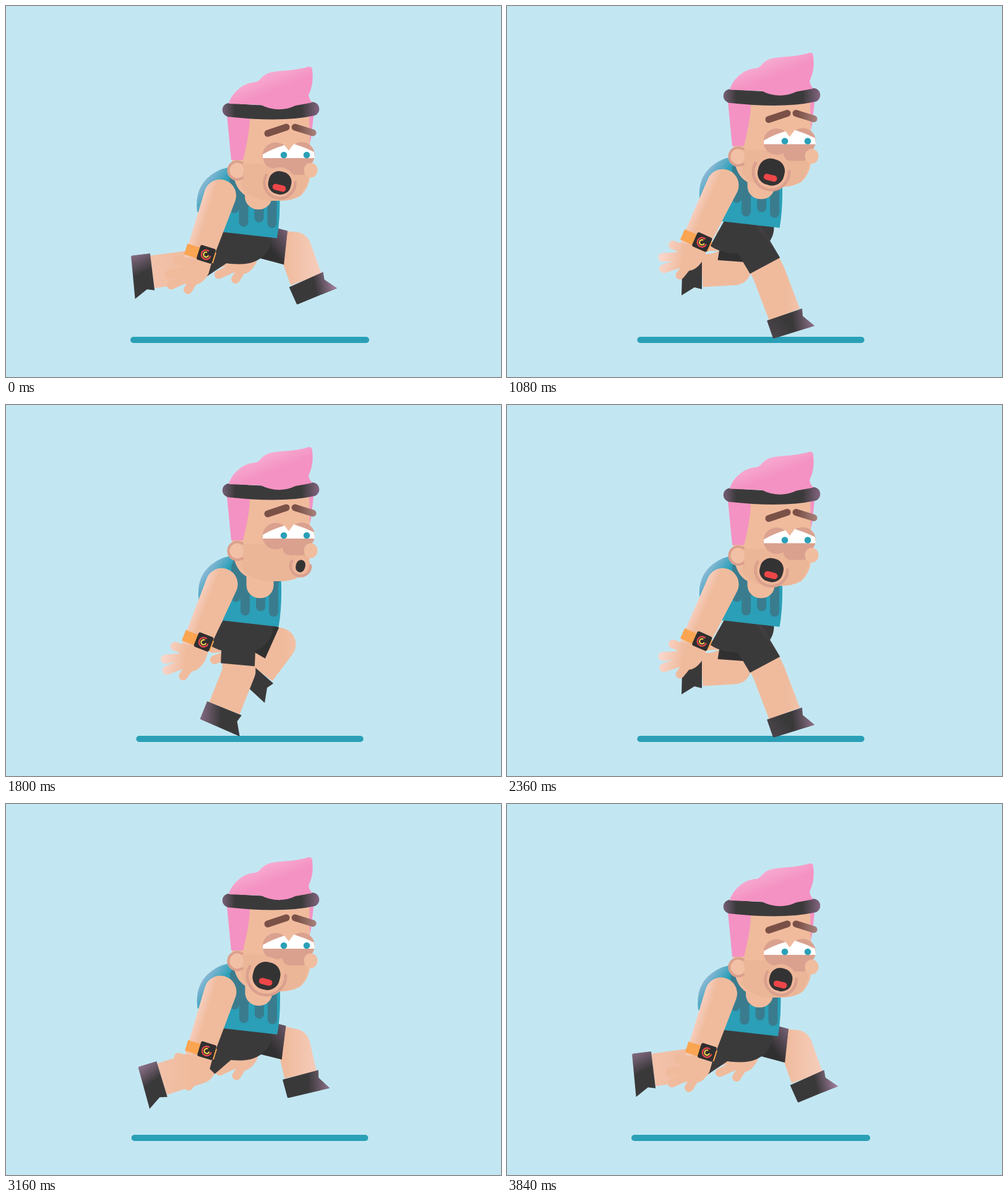
An HTML page that plays this animation: 800 by 600 pixels, repeating every 3.88 s.

```html
<!DOCTYPE html>
<html lang="en">
<head>
<meta charset="utf-8">
<title>Tired runner</title>
<style>
  html, body { margin: 0; width: 100%; height: 100%; overflow: hidden; background: #c3e7f2; }
  svg { display: block; width: 800px; height: 600px; }
</style>
</head>
<body>
<svg viewBox="0 0 800 600">
  <defs>
    <linearGradient id="skin" gradientUnits="userSpaceOnUse" x1="235" y1="0" x2="505" y2="0">
      <stop offset="0" stop-color="#f2c2aa"/><stop offset=".25" stop-color="#f0bb9d"/>
      <stop offset=".8" stop-color="#f0bb9d"/><stop offset="1" stop-color="#f5cdbb"/>
    </linearGradient>
    <linearGradient id="fingerLight" gradientUnits="userSpaceOnUse" x1="-48" y1="136" x2="-12" y2="128">
      <stop offset="0" stop-color="#fbdcd6"/><stop offset="1" stop-color="#fbdcd6" stop-opacity="0"/>
    </linearGradient>
    <linearGradient id="armEdge" x1="0" x2="1">
      <stop offset="0" stop-color="#f6cebe"/><stop offset=".3" stop-color="#f0bb9d"/>
    </linearGradient>
    <linearGradient id="heelLight" gradientUnits="userSpaceOnUse" x1="-34" y1="28" x2="0" y2="16">
      <stop offset="0" stop-color="#b48bb0"/><stop offset="1" stop-color="#b48bb0" stop-opacity="0"/>
    </linearGradient>
    <linearGradient id="toeLight" gradientUnits="userSpaceOnUse" x1="40" y1="24" x2="8" y2="18">
      <stop offset="0" stop-color="#c493bb"/><stop offset="1" stop-color="#b48bb0" stop-opacity="0"/>
    </linearGradient>
    <linearGradient id="hemLight" gradientUnits="userSpaceOnUse" x1="462" y1="355" x2="422" y2="385">
      <stop offset="0" stop-color="#b48bb0"/><stop offset="1" stop-color="#b48bb0" stop-opacity="0"/>
    </linearGradient>
    <linearGradient id="hairFill" gradientUnits="userSpaceOnUse" x1="415" y1="70" x2="430" y2="108">
      <stop offset="0" stop-color="#f8b3d6"/><stop offset="1" stop-color="#f492c3"/>
    </linearGradient>
    <linearGradient id="bandFill" gradientUnits="userSpaceOnUse" x1="350" y1="0" x2="506" y2="0">
      <stop offset="0" stop-color="#765f76"/><stop offset=".13" stop-color="#3b3a3b"/>
      <stop offset=".82" stop-color="#3b3a3b"/><stop offset="1" stop-color="#846580"/>
    </linearGradient>
    <linearGradient id="shirtFill" gradientUnits="userSpaceOnUse" x1="318" y1="258" x2="362" y2="290">
      <stop offset="0" stop-color="#a8c0de"/><stop offset=".7" stop-color="#2a9fb7"/>
    </linearGradient>
    <linearGradient id="browFill" gradientUnits="userSpaceOnUse" x1="470" y1="0" x2="502" y2="0">
      <stop offset="0" stop-color="#7b5147"/><stop offset="1" stop-color="#a9837e"/>
    </linearGradient>
    <clipPath id="shirtClip"><use href="#shirt"/></clipPath>
    <path id="shirt" d="M343 348L440 359Q446 325 444 280L390 246Q358 238 333 257Q306 277 311 316Z"/>
    <path id="boot" d="M-30 0H30L27 12L40 33L-28 31Q-30 31-30 29Z"/>
    <path id="fingers" fill="none" stroke-width="14" stroke-linecap="round" d="M-6 120L-34 121M-6 128L-41 146M-2 135L-32 162M3 135L-4 161"/>
    <g id="hand">
      <use href="#fingers" stroke="#f0bb9d"/>
      <path d="M-24 92H19L20 126Q15 149 1 150Q-22 148-24 122Z" fill="#f0bb9d"/>
    </g>
    <g id="leg">
      <path class="limb" fill="none" stroke="url(#skin)" stroke-width="53" stroke-linejoin="round"/>
      <g class="foot">
        <use href="#boot" fill="#3a393a"/>
        <use class="heel" href="#boot" fill="url(#heelLight)"/>
        <use class="toe" href="#boot" fill="url(#toeLight)"/>
      </g>
      <path class="shorts"/>
      <path class="hem" fill="url(#hemLight)"/>
    </g>
  </defs>

  <line id="ground" y1="540" y2="540" stroke="#2aa0b7" stroke-width="10" stroke-linecap="round"/>
  <use id="farArm" href="#hand"/>
  <g id="farLeg" fill="#313031"></g>
  <path id="pelvis" fill="#3b3a3b" d="M352 345L430 350Q434 370 420 386Q405 401 380 401Q345 401 328 388Z"/>
  <g id="nearLeg" fill="#3b3a3b"></g>

  <g id="torso">
    <use href="#shirt" fill="url(#shirtFill)"/>
    <g clip-path="url(#shirtClip)" opacity=".5">
      <path d="M366 244Q366 290 392 308L432 306L444 280L390 240Z" fill="#4a5a66"/>
      <path d="M371 262V311M386 270V333M411 300V326M432 285V335" fill="none" stroke="#4a5a66" stroke-width="15" stroke-linecap="round"/>
    </g>
    <rect x="388" y="250" width="44" height="62.500" rx="21" fill="#f0bb9d"/>
  </g>

  <g id="head">
    <path d="M489 148H497L493 184L490 196Z" fill="#f492c3"/>
    <path d="M384 145H490L492 236Q492 262 476 277Q462 285 444 285H428C400 285 375 280 368 246L365 215Z" fill="#f0bb9d"/>
    <path d="M384 225H488Q490 262 474 277Q460 285 444 285H428Q392 284 380 262Z" fill="#e0a98d" opacity=".35"/>
    <path d="M357 147L394 151Q394 175 383 219H364Z" fill="#f492c3"/>
    <circle cx="371" cy="236" r="13" fill="#f2c0a4"/>
    <path d="M382 224A14.500 14.500 0 1 0 382 248" fill="none" stroke="#dba08d" stroke-width="4" stroke-linecap="round"/>
    <g fill="#daa18f">
      <circle cx="436" cy="212" r="21.500"/><circle cx="478" cy="211" r="21"/>
      <rect x="447" y="205" width="43" height="38" rx="12"/>
    </g>
    <ellipse cx="492.500" cy="235.500" rx="11" ry="12" fill="#f1bd9f"/>
    <path d="M415 216V210Q430 201 450 195L457 204L465 193Q482 198 498 206L499 216Z" fill="#fff"/>
    <g fill="#2aa0b7"><circle cx="449" cy="211" r="5.300"/><circle cx="486" cy="211" r="5.300"/></g>
    <g fill="none" stroke-width="11" stroke-linecap="round">
      <path d="M423 176L453 166" stroke="#7b5147"/><path d="M467 166L496 175" stroke="url(#browFill)"/>
    </g>
    <path d="M361 138Q445 147 495 136.500" fill="none" stroke="url(#bandFill)" stroke-width="22.500" stroke-linecap="round"/>
    <path fill="url(#hairFill)" d="M360 128C364 112 382 94 403 93C413 92 411 79 435 76C455 74 475 73 489 68Q495 67 495 74C497 92 494 103 489 114Q490 121 495 126Q480 129 468 131Q440 144 412 130Z"/>
    <g id="mouth">
      <circle id="lip" fill="#eeb699"/>
      <path id="lipLine" fill="none" stroke="#dba08d" stroke-width="4.500" stroke-linecap="round"/>
      <rect id="hole" fill="#343334"/>
      <rect id="tongue" x="-11" y="-5" width="22" height="10" rx="5" fill="#ee4648"/>
    </g>
  </g>

  <g id="nearArm">
    <use href="#hand"/>
    <use id="pale" href="#fingers" stroke="url(#fingerLight)"/>
    <path d="M-26 0A26 26 0 0 1 26 0L19 112H-25Z" fill="url(#armEdge)"/>
    <rect x="-27" y="90" width="49" height="18" fill="#faa551"/>
    <rect x="-6" y="85" width="26" height="25" rx="3" fill="#302f30"/>
    <g fill="none" stroke-width="2.200">
      <circle cx="7" cy="98" r="7.500" stroke="#ee4a4c" stroke-dasharray="38 9"/>
      <circle cx="7" cy="98" r="4" stroke="#f3d34e" stroke-dasharray="19 6"/>
    </g>
  </g>
</svg>
<script>
const STEP = 40, FRAMES = 97, STRIDE = 16, BREATH = 1920;
const $ = id => document.getElementById(id);
const set = (el, attrs) => { for (const k in attrs) el.setAttribute(k, attrs[k]); };
const wave = (p, peak, period) => Math.cos(2 * Math.PI * (p - peak) / period);

// phase, hem x y, thigh angle, knee x y, ankle x y, foot angle
const LEG = [
  [0, 310, 414, 56, 304, 421, 236.5, 430, 83],
  [3, 368, 413, 4, 368, 425, 315, 428, 90],
  [5, 430, 385, -66, 442, 387, 409.5, 430.5, 41],
  [7, 449, 386, -83, 465, 390, 476, 438, -15],
  [8, 452, 391, -84, 467, 392, 485, 442.5, -24],
  [11, 417, 420, -28, 423, 432, 448.5, 499, -19],
  [12, 396, 423, -11, 401, 434, 403, 510, 0],
  [13, 374.5, 420, 5, 377, 430, 353, 490.5, 22],
  [15, 318, 417, 45, 312, 426, 252, 445, 73]
];
// phase, eye height
const HEAD = [[0, 239], [1, 241], [3, 218.5], [4, 207], [5, 211], [7, 229]];
// time, x, drop below the eyes, half width, half height, lip radius
const MOUTH = [
  [0, 442.5, 45, 18.5, 18.5, 25],
  [440, 427.5, 48.5, 19, 19, 26],
  [1080, 427, 50, 21.5, 21.5, 29],
  [1240, 421, 49, 22, 22.5, 31],
  [1700, 474, 49.5, 8, 10.5, 16],
  [1800, 476, 49.5, 7.5, 10, 16]
];

// Smooth periodic interpolation through the rows of a key table
function sample(keys, t, period) {
  const n = keys.length;
  t = (t % period + period) % period;
  const at = i => {
    const lap = Math.floor(i / n);
    const [k, ...v] = keys[i - lap * n];
    return { k: k + lap * period, v };
  };
  let i = n - 1;
  while (keys[i][0] > t) i--;
  const [a, b, c, d] = [-1, 0, 1, 2].map(o => at(i + o));
  const span = c.k - b.k, s = (t - b.k) / span, s2 = s * s, s3 = s2 * s;
  return b.v.map((y, j) => {
    const m0 = (c.v[j] - a.v[j]) / (c.k - a.k) * span;
    const m1 = (d.v[j] - y) / (d.k - b.k) * span;
    return y * (2 * s3 - 3 * s2 + 1) + m0 * (s3 - 2 * s2 + s)
      + c.v[j] * (3 * s2 - 2 * s3) + m1 * (s3 - s2);
  });
}

function makeLeg(id) {
  const root = $(id);
  root.append(...$('leg').cloneNode(true).children);
  const part = name => root.querySelector('.' + name);
  const [limb, foot, heel, toe, shorts, hem] = ['limb', 'foot', 'heel', 'toe', 'shorts', 'hem'].map(part);
  return (p, hx, hy) => {
    const [ex, ey, thigh, kx, ky, ax, ay, turn] = sample(LEG, p, STRIDE);
    const r = thigh * Math.PI / 180, nx = 27.5 * Math.cos(r), ny = 27.5 * Math.sin(r);
    const sx = ex + 8 * Math.sin(r), sy = ey - 8 * Math.cos(r);
    set(limb, { d: `M${sx} ${sy}L${kx} ${ky}L${ax} ${ay}` });
    set(foot, { transform: `translate(${ax} ${ay}) rotate(${turn})` });
    const d = `M${hx - nx} ${hy - ny}L${hx + nx} ${hy + ny}L${ex + nx} ${ey + ny}L${ex - nx} ${ey - ny}Z`;
    const front = Math.max(0, wave(p, 9, STRIDE));
    set(shorts, { d });
    set(hem, { d, opacity: front * .75 });
    set(heel, { opacity: Math.max(0, wave(p, 14.5, STRIDE)) * .8 });
    set(toe, { opacity: front * .85 });
  };
}
const nearLeg = makeLeg('nearLeg'), farLeg = makeLeg('farLeg');

function drawMouth(time) {
  const [x, drop, rx, ry, lip] = sample(MOUTH, time, BREATH);
  const open = Math.min(1, Math.max(0, (rx - 9) / 9));
  const a = lip * .96, b = lip * .28;
  set($('mouth'), { transform: `translate(${x} ${211 + drop}) rotate(14)` });
  set($('lip'), { r: lip });
  set($('lipLine'), { d: `M${-a} ${-b}A${lip} ${lip} 0 1 0 ${a} ${-b}` });
  set($('hole'), { x: -rx, y: -ry, width: 2 * rx, height: 2 * ry, rx: rx * .9, ry: ry * .88 });
  set($('tongue'), { transform: `translate(1 ${ry * .43}) scale(${open})`, opacity: open });
}

function draw(frame) {
  const p = frame % STRIDE, bob = wave(p, 0, 8);
  const dx = -.5 - 1.5 * bob, dy = 6.75 + 9.75 * bob;
  const half = 182.5 + 5.5 * bob;
  set($('ground'), { x1: 394 - half, x2: 394 + half });

  const shift = `translate(${dx} ${dy})`;
  set($('torso'), { transform: shift });
  set($('pelvis'), { transform: shift });
  nearLeg(p, 377 + dx, 354 + dy);
  farLeg(p + STRIDE / 2, 377 + dx, 354 + dy);

  const swing = `rotate(${20.5 - 3.6 * wave(p, 7.3, 8)})`;
  set($('nearArm'), { transform: `translate(${348 + dx} ${290 + dy}) ${swing}` });
  set($('farArm'), { transform: `translate(${425 + dx} ${273 + dy}) ${swing}` });
  set($('pale'), { opacity: .5 - .5 * bob });

  const settle = 2 * Math.max(0, 1 - frame / 4);
  set($('head'), { transform: `translate(0 ${sample(HEAD, p, 8)[0] - 211 + settle})` });
  drawMouth(frame * STEP);
}

const start = performance.now();
function tick() {
  draw(Math.floor((performance.now() - start) / STEP) % FRAMES);
  requestAnimationFrame(tick);
}
tick();
</script>
</body>
</html>
```
